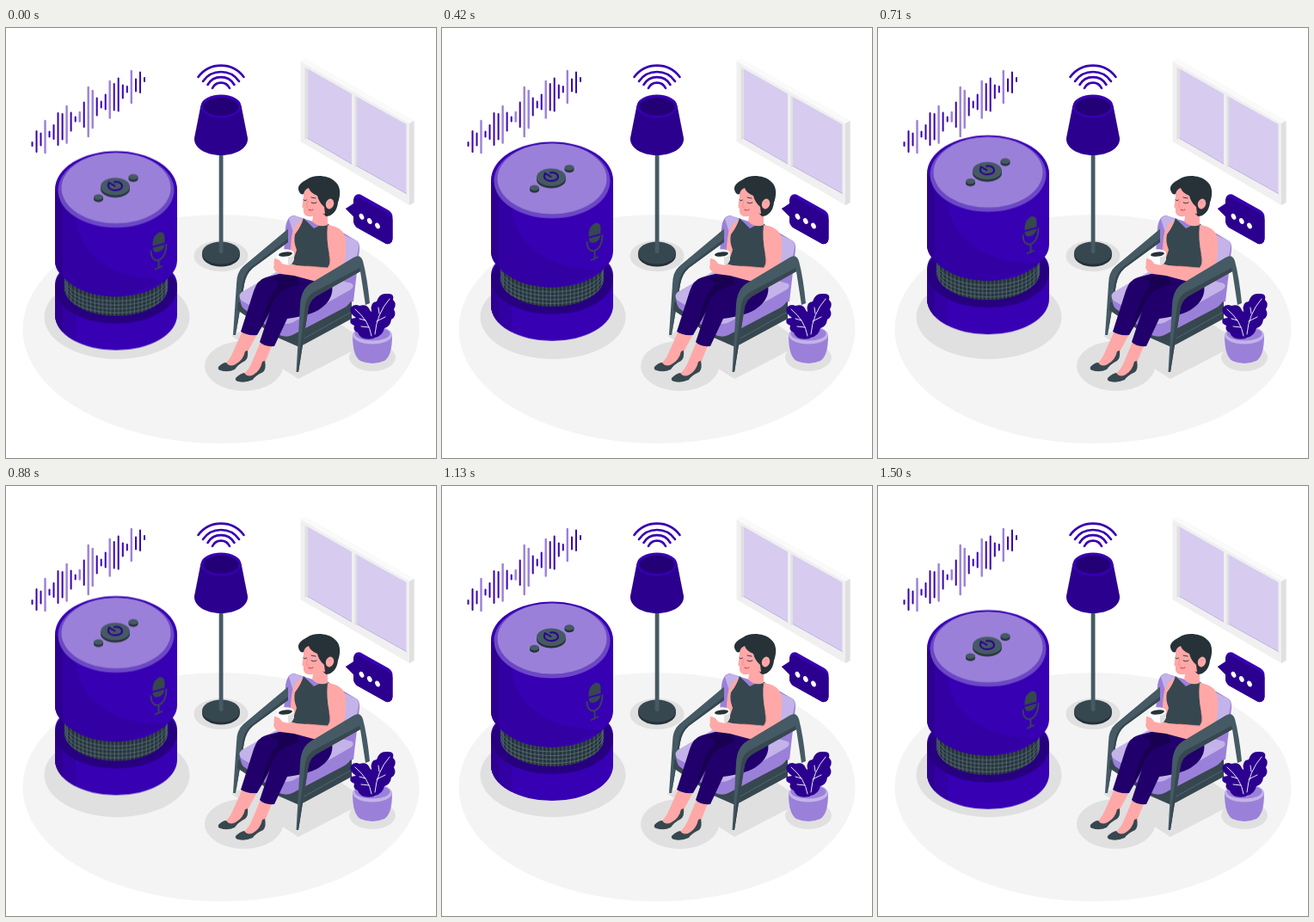
Write an HTML page without scripts that moves like this. It is 500 by 500 pixels and loops after 1.54 s.

```html
<!DOCTYPE html>
<html lang="en">
<head>
<meta charset="utf-8">
<title>Smart speaker at home</title>
<style>
  html, body { margin: 0; width: 100%; height: 100%; overflow: hidden; background: #fff; }
  svg { display: block; width: 100vw; height: 100vh; }
  .main { fill: #3700b3; }
  .deep { fill: #2c008f; }
  .night { fill: #21006b; }
  .lilac { fill: #9b80d9; }
  .pale { fill: #c3b3e8; }
  .glass { fill: #d7ccf0; }
  .shadow { fill: #e0e0e0; }
  .slate { fill: #455a64; }
  .dark { fill: #37474f; }
  .ink { fill: #263238; }
  .skin { fill: #ffa8a7; }
  .line { fill: none; stroke-linecap: round; stroke-linejoin: round; }
  .speaker { animation: hover 1540ms -5ms infinite; }
  /* 37 even ticks: up 18, down 18, with one tick of rest at the top */
  @keyframes hover {
    0% { transform: translateY(-1.08px); animation-timing-function: steps(17, end); }
    45.946% { transform: translateY(-19.46px); animation-timing-function: step-end; }
    48.649% { transform: translateY(-19.46px); animation-timing-function: steps(18, end); }
    97.297%, 100% { transform: translateY(0); animation-timing-function: step-end; }
  }
</style>
</head>
<body>
<svg viewBox="0 0 500 500">
  <defs>
    <pattern id="mesh" width="4.6" height="40" patternUnits="userSpaceOnUse">
      <path d="M2 0v40" stroke="#607d8b" stroke-width=".7"/>
    </pattern>
    <path id="band" d="M68 284V304C70 322 97 335 128 335S186 322 188 304V284Z"/>
    <clipPath id="bandClip"><use href="#band"/></clipPath>
    <path id="ring" d="M68 291C70 308 97 318 128 318S186 308 188 291"/>
    <path id="upper" d="M57 188A71 44.500 0 0 1 199 188V269C199 277 197 282 191 288C178 304 155 312.500 128 312.500S78 304 65 288C59 282 57 277 57 269Z"/>
    <clipPath id="upperClip"><use href="#upper"/></clipPath>
    <path id="base" d="M57 300C57 293 59 288 64 283H192C197 288 199 293 199 300V334A71 41 0 0 1 57 334Z"/>
    <clipPath id="baseClip"><use href="#base"/></clipPath>
    <g id="knob">
      <path class="ink" d="M-5.500-1V1.500A5.500 3.300 0 0 0 5.500 1.500V-1Z"/>
      <ellipse class="slate" cy="-1" rx="5.500" ry="3.300"/>
    </g>
  </defs>

  <ellipse cx="250" cy="350" rx="230.500" ry="133" fill="#f4f4f4"/>
  <g class="shadow">
    <ellipse cx="129" cy="336" rx="84.500" ry="49"/>
    <ellipse cx="250" cy="265" rx="31.500" ry="18"/>
    <ellipse cx="276.500" cy="393" rx="45.500" ry="29"/>
    <ellipse cx="426" cy="383" rx="27" ry="16"/>
    <path d="M262 358L340 408L421 366L345 315Z"/>
  </g>

  <g class="line" stroke="#3700b3" stroke-width="2">
    <path d="M30.500 133v4M35.500 120v24M40.500 122.500v14M50.500 120.500v6M55.500 113v16M60.500 99v37M65.600 100v29.500M75.600 98.500v21M80.700 103.500v5M90.700 86.500v28.500M105.700 81.500v20M110.700 85.500v7M115.700 77.500v17M125.700 65v30.500M130.700 58.500v38M135.800 66.500v15M140.800 68v6.500M151 59.500v14M156 51.500v23.500M161 58v4"/>
    <path stroke="#9b80d9" stroke-width="2.400" d="M45.500 108v37M70.600 91v42.500M85.700 98v10.500M95.700 69v57M100.700 73v43M120.700 62v42.500M145.800 50v37"/>
  </g>

  <!-- window -->
  <path fill="#f0f0f0" d="M342.500 39L348 36L474.500 108V203L469 206L342.500 132Z"/>
  <path fill="#fafafa" d="M342.500 39L348 36L474.500 108L469 111Z"/>
  <path fill="#e0e0e0" d="M469 111L474.500 108V203L469 206ZM347.500 46L351 47.500V128.500L347.500 130ZM405.500 79L408 80V160.500L405.500 162Z"/>
  <path class="glass" d="M351 47.500L402 76.500V158L351 128.500ZM408 80L465.500 112V192.500L408 160.500Z"/>
  <path class="line" stroke="#b9a9df" stroke-width=".8" d="M351 128.500L402 158M408 160.500L465.500 192.500"/>

  <!-- lamp -->
  <path class="ink" d="M228 262V264A22 13.500 0 0 0 272 264V262Z"/>
  <ellipse class="dark" cx="250" cy="261.500" rx="22" ry="13"/>
  <path class="slate" d="M247.700 145H252.500V261Q250 263 247.700 261Z"/>
  <path class="deep" d="M226.500 90L219 128C218 139 232 148 250 148S282 139 281 128L273.500 90Z"/>
  <ellipse class="main" cx="250" cy="91" rx="23.500" ry="13.500"/>
  <ellipse cx="250" cy="91.500" rx="20.500" ry="10.500" fill="#240077"/>
  <path class="line" stroke="#3700b3" stroke-width="2.600" d="M223.500 57A33 33 0 0 1 276.500 57M229 62A25.500 25.500 0 0 1 271 62M234.500 66A18 18 0 0 1 265.500 66M240 70A11 11 0 0 1 260 70"/>

  <!-- speech bubble -->
  <path class="main" d="M395 210L404 204V200Q405 192 412 193.500L445 212Q449.500 215 449.500 220V245Q449 252 442 251L408 232Q404 229 404 223V219Z"/>
  <path class="deep" d="M395 210L404 206V201Q405 195 411 197.500L444 215.500Q449.500 219 449.500 223V245Q449 252 442 251L408 232Q404 229 404 223V219Z"/>
  <g fill="#fff">
    <ellipse cx="413.500" cy="219.300" rx="2.500" ry="3.700" transform="rotate(-28 413.500 219.300)"/>
    <ellipse cx="422.800" cy="224.500" rx="2.500" ry="3.700" transform="rotate(-28 422.800 224.500)"/>
    <ellipse cx="432" cy="230" rx="2.500" ry="3.700" transform="rotate(-28 432 230)"/>
  </g>

  <!-- chair, behind the sitter -->
  <path class="lilac" d="M325 232Q327 218 335 218L385 234L407 247Q412 250 411 258L404 318L378 325L322 278Z"/>
  <path class="pale" d="M329 222Q332 217 338 219L350 224L334 238ZM392 240L407 247Q412 251 409 260L404 286L394 290Z"/>
  <path class="slate" d="M264 357L268 298Q268 284 276 277L328 233.500V249L287 279Q279 286 277 298L267 357Z"/>
  <path class="dark" d="M328 245V249L287 279Q279 286 277 298L267 357L275 297Q277 284 285 278Z"/>
  <path class="dark" d="M270 318L322 347L402 318V338L341 371L316 360L269 328Z"/>
  <path class="lilac" d="M272 310L325 341L402 299V315Q400 322 392 326L333 357Q325 361 316 356L276 326Q272 322 272 310Z"/>
  <path class="pale" d="M274 307L326 277L402 297Q406 300 401 304L334 342Q326 346 318 342L274 317Q269 312 274 307Z"/>
  <path class="line" stroke="#607d8b" stroke-width=".8" stroke-dasharray="1 1.500" d="M345 362L400 331"/>

  <!-- sitter -->
  <g>
    <path class="skin" d="M275 352L263 379Q259 388 252 392L263 397L276 386L292 356ZM298 360L285 391Q280 401 272 405L284 410L297 399L310 367Z"/>
    <path class="dark" d="M247 394Q252 389 256 389Q260 395 267 391Q276 386 278 376L281 375Q282 384 278 387Q270 391 266 397Q258 401 249 398Q246 397 247 394ZM267 407Q272 402 277 401Q281 407 288 403Q296 398 298 388L301 387Q303 396 299 400Q290 404 287 409Q278 413 270 411Q266 410 267 407Z"/>
    <path class="night" d="M336 281L302 290Q292 293 288 306L273 353Q280 358 292 357L310 325L355 311L360 290Z"/>
    <path class="night" d="M338 284L379 297Q382 315 366 326Q356 334 327 338L312 370Q300 371 295 365L310 320Q315 305 333 300Z"/>
    <path fill="#190052" d="M338 284L306 291Q322 294 314 303Q304 313 296 350L310 320Q315 305 340 298Z"/>
    <path class="skin" d="M343 223Q333 232 332 244L330 265L317 267Q311 271 312 277Q318 282 324 277L343 268L348 240Z"/>
    <path class="dark" d="M346 221Q343 231 336 240Q334 248 338 258L332 276Q350 291 377 297L380 272Q386 256 376 229L372 226L358 233Z"/>
    <path class="skin" d="M358 213L356 225Q364 233 374 229V208Z"/>
    <path class="skin" d="M374 229Q392 231 395 245Q396 266 391 286Q389 299 376 299L335 288L320 286Q312 284 311 278Q312 272 318 271L338 276L374 279Q378 274 376 264Q372 244 374 229Z"/>
    <path class="line" stroke="#f28f8f" stroke-width=".9" d="M376 264Q379 274 374 279L350 277"/>
    <path fill="#fff" d="M315 262V271Q317 277 325 276Q333 276 335 269V262Z"/>
    <path fill="#e0e0e0" d="M328 265L335 262V269Q333 275 328 276Z"/>
    <ellipse cx="325" cy="262" rx="10" ry="4.800" fill="#fafafa"/>
    <ellipse class="ink" cx="325" cy="263" rx="8" ry="2.600" transform="rotate(-7 325 263)"/>
    <path class="skin" d="M312 268Q318 268 321 274L336 278L331 285L318 284Q310 281 312 268Z"/>
    <path class="ink" d="M340 188C339 181 347 178 350 176C358 170 374 171 382 178C390 184 389 195 386 203C385 213 379 219 372 219L357 204L346 193Q342 195 340 188Z"/>
    <path class="skin" d="M352 186Q346 188 346 195L344.500 207Q344 209 346 210Q345 218 351 219Q358 220 362 215L371 216L370 208Q364 203 362 195Q354 192 352 186Z"/>
    <ellipse class="skin" cx="376.500" cy="204.500" rx="4.600" ry="6" transform="rotate(18 376.500 204.500)"/>
    <path class="line" stroke="#263238" stroke-width=".9" d="M346 200Q348 202 349.500 200M355 203Q358 205 361 203M355 197L360 198"/>
    <path class="line" stroke="#d64f5c" stroke-width="1.100" d="M352 211Q354 213 357 211"/>
    <path class="line" stroke="#f28f8f" stroke-width=".9" d="M351 201L349 208L352 208M375 203L378 202"/>
  </g>

  <!-- near arm of the chair -->
  <path class="slate" d="M337.500 400L342 322Q343 304 354 297L404 267Q412 262 415 271Q420 290 423 320L418 322L412 283L364 310Q355 314 352 324L340 400Z"/>
  <path class="dark" d="M340 400L352 324Q355 314 364 310L412 283L411 279L360 306Q350 311 348 322L338.500 400Z"/>

  <!-- plant -->
  <path class="lilac" d="M403 357C403 374 406 383 412 387Q426 393 440 387C446 383 449 374 449 357Z"/>
  <ellipse class="pale" cx="426" cy="357" rx="23" ry="10.500"/>
  <ellipse class="lilac" cx="426" cy="355.500" rx="20.500" ry="8"/>
  <path class="deep" d="M424 360Q420 342 425 329Q423 319 431 318Q434 308 443 309Q452 308 450 316Q455 321 451 327Q455 335 448 339Q447 347 440 349Q438 358 429 360ZM428 361Q412 364 409 354Q403 352 405 346Q398 343 401 338L407 337Q398 331 401 325Q405 320 411 323Q420 320 423 328Q428 333 426 341Q430 352 428 361Z"/>
  <path class="line" stroke="#fff" stroke-width=".9" d="M406 327Q422 340 425 358M418 340L411 338M422 348L413 347M446 315Q431 332 429 356M434 332L433 325M431 341L441 336"/>

  <g transform="translate(0 .7)">
    <g class="speaker">
      <use href="#base" class="main"/>
      <g clip-path="url(#baseClip)">
        <path fill="#3200a3" d="M57 300H81V376H57Z"/>
        <path fill="#2d0092" d="M57 300H66V376H57Z"/>
        <ellipse cx="128" cy="303" rx="71" ry="41" fill="#270080"/>
      </g>
      <use href="#band" class="ink"/>
      <use href="#band" fill="url(#mesh)"/>
      <g clip-path="url(#bandClip)" class="line" stroke="#607d8b" stroke-width=".7">
        <use href="#ring"/><use href="#ring" y="4.500"/><use href="#ring" y="9"/><use href="#ring" y="13.500"/>
      </g>
      <use href="#upper" class="main"/>
      <g clip-path="url(#upperClip)">
        <path fill="#3200a3" d="M57 190L81 222C86 262 118 293 190 293L128 316L50 300Z"/>
        <path fill="#2d0092" d="M57 190H66V300H57Z"/>
      </g>
      <ellipse cx="128" cy="189" rx="67.500" ry="43.500" fill="#6c48c5"/>
      <ellipse class="lilac" cx="128" cy="186.500" rx="63.500" ry="41"/>
      <path class="ink" d="M110 185V187.500A17 10 0 0 0 144 187.500V185Z"/>
      <ellipse class="slate" cx="127" cy="184.700" rx="17" ry="10.300"/>
      <path class="line" stroke="#2c008f" stroke-width="1.900" d="M120 180.500C117 184.500 120 189 127 189S136 185.500 134.500 182.500S129 179 126 179.500M119.500 180L126.500 184"/>
      <use href="#knob" x="107.500" y="198"/>
      <use href="#knob" x="148" y="174.500"/>
      <path class="dark" d="M170.500 254V250Q171.500 241 178 238Q184.500 236.500 184.500 244V250ZM170.500 256L184.500 252Q183.500 258.500 178 260.500Q171 262.500 170.500 256Z"/>
      <path class="line" stroke="#37474f" stroke-width="1.800" d="M168.500 260Q169 271 177 270.500Q186 267 186.500 252M177.500 271V279M173.500 281L181.500 277.500"/>
    </g>
  </g>
</svg>
</body>
</html>
```
